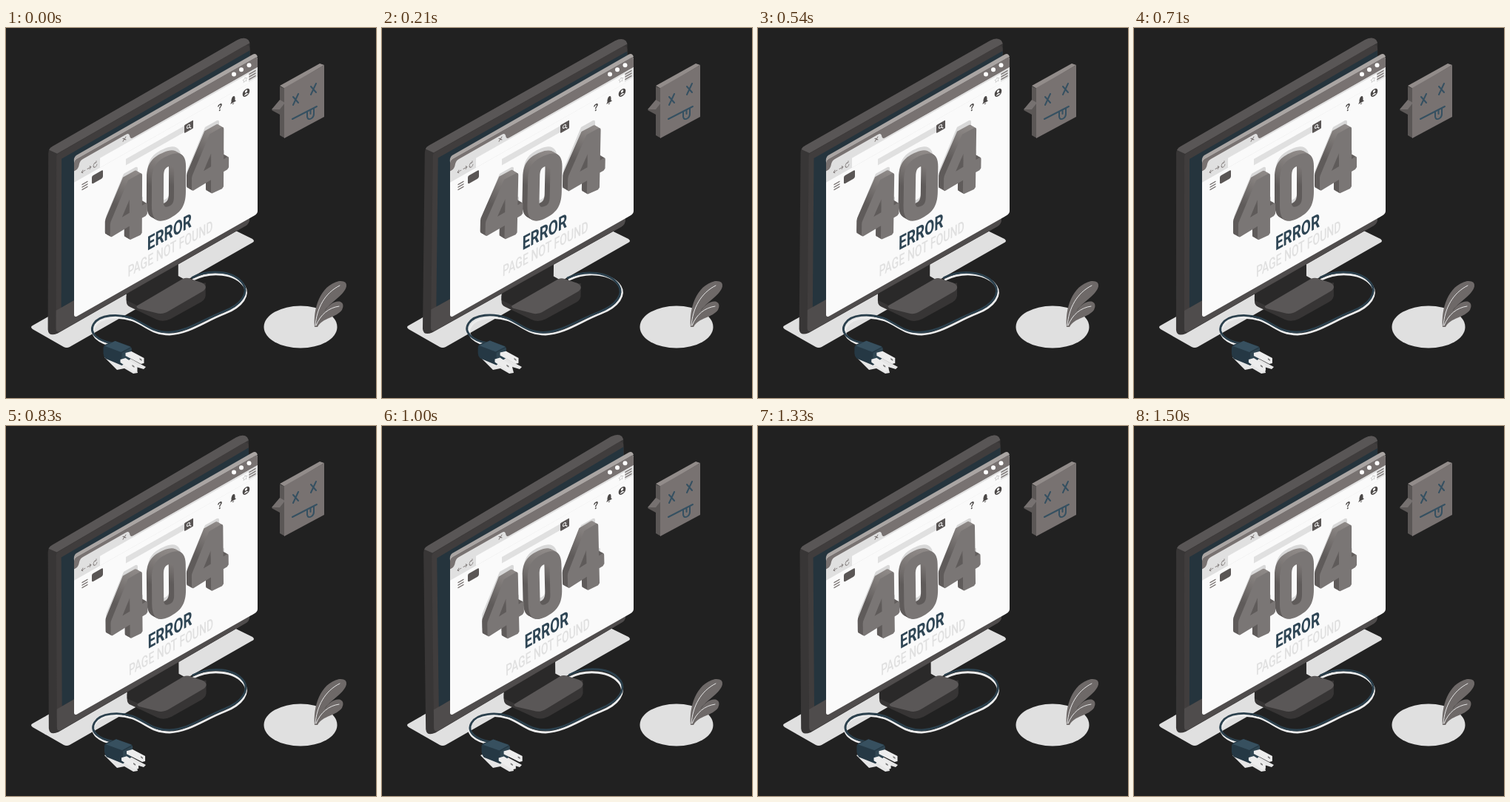
Animation of 500 by 500 pixels, one loop 1540 ms. Source, as an HTML page:

```html
<!DOCTYPE html>
<html lang="en">
<head>
<meta charset="utf-8">
<title>404</title>
<style>
html, body { margin: 0; width: 100%; height: 100%; overflow: hidden; background: #212121; }
svg { display: block; width: 100vw; height: 100vh; }
text { font-family: Roboto, sans-serif; }
.line { fill: none; stroke-linecap: round; stroke-linejoin: round; }
</style>
</head>
<body>
<svg viewBox="0 0 500 500">
  <defs>
    <path id="four" fill-rule="evenodd" d="M165 206 L181 197 Q184 196 184 199 V240 L189 237 Q191 236 191 239 V251 L189 254 L184 257 V277 L182 280 L169 286 Q167 287 167 284 V268 L144 282 Q141 284 141 280 V266 Q141 263 143 259Z M167 232 V250 L157 256Z"/>
    <path id="zero" fill-rule="evenodd" d="M197 206 C197 186 206 178 220 172 C236 165 243 172 243 187 V221 C243 241 236 250 220 258 C204 265 197 259 197 240Z M213 201 C213 192 215 189 220 187 C225 185 227 187 227 194 V228 C227 236 225 239 220 241 C215 243 213 241 213 235Z"/>
    <g id="digits">
      <use href="#four"/><use href="#zero"/><use href="#four" x="110" y="-63"/>
    </g>
    <linearGradient id="side" x2="0" y2="1">
      <stop stop-color="#8f8a88"/><stop offset=".5" stop-color="#5f5b5a"/>
    </linearGradient>
    <path id="cord" class="line" stroke-width="2.8" d="M143 426 C126 423 111 413 119 400 C127 387 152 386 170 392 C190 400 197 411 220 411 C246 410 266 394 294 383 C320 373 328 357 321 346 C309 328 276 325 252 337"/>
  </defs>

  <!-- Floor -->
  <path fill="#e0e0e0" d="M36 402 L284 261 L333 285 Q337 288 333 290 L86 431 Q82 433 78 431 L36 407 Q32 404 36 402Z"/>
  <use href="#cord" x="1" y="3" stroke="#ededed"/>
  <path fill="#e6e6e6" d="M133 445 L150 437 L189 458 L186 461 L176 458 L178 466 L172 467 L160 460 L150 462Z"/>
  <ellipse cx="398" cy="404" rx="49.5" ry="28.5" fill="#e0e0e0"/>

  <g id="monitor">
    <use href="#cord" stroke="#2b404d"/>
    <!-- Stand -->
    <path fill="#373535" d="M163 362 L270 344 V358 Q271 366 264 370 L223 393 Q213 398 204 394 L168 377 Q163 375 163 369Z"/>
    <path fill="#2a2929" d="M163 359 L233 318 V335 L242 340 L180 376 L163 368Z"/>
    <path fill="#5a5757" d="M178 375 L239 339 Q243 337 247 338 L265 344 Q274 349 267 355 L221 382 Q212 388 203 385 L179 379 Q175 377 178 375Z"/>
    <!-- Screen body -->
    <path fill="#383636" d="M57 170 Q57 163 63 160 L312 16 Q327 9 329 21 V258 Q329 264 324 267 L70 413 Q58 418 57 408Z"/>
    <path fill="#595656" d="M58 165 Q59 162 63 160 L312 16 Q322 11 327 16 L329 20 L69 170Z"/>
    <path fill="#403d3d" d="M68 175 Q68 171 72 169 L320 25 Q329 20 329 28 V258 Q329 264 324 267 L74 410 Q68 413 68 406Z"/>
    <path fill="#4f4c4c" d="M68 382 L329 233 V258 Q329 264 324 267 L74 410 Q68 413 68 406Z"/>
    <path fill="#25343d" d="M75 177 L329 30 V233 L75 378Z"/>
    <!-- Plug -->
    <path fill="#253844" d="M132 432 Q133 428 137 427 L148 423 L168 430 Q171 432 170 438 V446 L157 456 L135 447 Q132 444 132 440Z"/>
    <path fill="#37505f" d="M134 430 L148 423 L169 431 L156 438Z"/>
    <path fill="#304652" d="M157 439 L170 432 V446 L157 456Z"/>
    <path fill="#ededed" d="M162 439 L170 437 L187 446 V453 L183 454 L162 443Z M155 448 L162 446 L178 456 V463 L173 464 L155 452Z"/>
    <path fill="#777" d="M181 446 l3 2 v2 l-3 -2Z M171 455 l3 2 v2 l-3 -2Z"/>
  </g>

  <!-- Browser window: u runs along the slanted edge, v runs down -->
  <path fill="#aaa5a3" d="M92 181 Q91 175 95 172 L333 36 Q338 33 340 39 L96 183Z"/>
  <g transform="matrix(1 -.567 0 1 92 178.7)">
    <rect width="248" height="213" rx="4" fill="#fafafa"/>
    <path fill="#787271" d="M0 15 V4 Q0 0 4 0 H244 Q248 0 248 4 V15Z"/>
    <path fill="#e0e0e0" d="M0 30 V15 H2 Q6 15 7 9 Q8 5 12 5 H70 Q74 5 75 9 Q76 15 80 15 H248 V30Z"/>
    <path fill="#fafafa" d="M35 17 H236 V28 H248 V30 H35Z"/>
    <g class="line" stroke="#787271">
      <path d="M66 8 l4 4 m0 -4 l-4 4"/>
      <path stroke-width=".8" d="M10 22 h5 m-5 0 l2 -2 m-2 2 l2 2 M18 22 h5 m0 0 l-2 -2 m2 2 l-2 2 M30 20 a2.5 3 0 1 0 1 3 m-1 -5 v2 h-2"/>
      <path stroke-width="1.4" d="M237 18 h8 m-8 3.500 h8 m-8 3.500 h8 M11 39 h7 m-7 3.500 h7 m-7 3.500 h7"/>
      <path stroke="#ccc" stroke-width=".8" d="M231 19 l1 2 h2 l-1.5 2 l.5 2 l-2 -1 l-2 1 l.5 -2 l-1.5 -2 h2Z"/>
    </g>
    <rect x="24" y="35" width="15" height="11" rx="2" fill="#5a5655"/>
    <rect x="70" y="38" width="79" height="8.5" fill="#e0e0e0"/>
    <rect x="149" y="37" width="12" height="11" rx="1" fill="#5a5655"/>
    <g class="line" stroke="#fafafa"><circle cx="154.500" cy="42" r="2"/><path d="M156 44 l2 2"/></g>
    <text x="197" y="45" font-size="13" font-weight="700" text-anchor="middle" fill="#4b4847">?</text>
    <path fill="#4b4847" d="M211 44 L212.500 42 V39 Q212.500 36 215 35.500 Q217.500 36 217.500 39 V42 L219 44Z M213.500 45 h3 l-1.500 1.500Z"/>
    <circle cx="232.500" cy="40.500" r="4.800" fill="#4b4847"/>
    <circle cx="232.500" cy="38.700" r="1.700" fill="#fafafa"/>
    <path fill="#fafafa" d="M229.500 43.500 Q232.500 39.500 235.500 43.500Z"/>
  </g>
  <g fill="#fff"><circle cx="308" cy="62.500" r="3"/><circle cx="318" cy="56.300" r="3"/><circle cx="328.500" cy="50.200" r="3"/></g>
  <use href="#digits" x="-6" y="-9" fill="#d8d8d8"/>

  <g id="number">
    <g id="depth" fill="url(#side)"></g>
    <use href="#digits" fill="#7a7675"/>
  </g>
  <g id="message">
    <text transform="matrix(.73 -.4 0 1 191 301)" font-size="26" font-weight="700" fill="#2f4655">ERROR</text>
    <text transform="matrix(.67 -.368 0 1 165 337)" font-size="21" font-weight="500" fill="#e0e0e0">PAGE NOT FOUND</text>
  </g>

  <!-- Speech bubble -->
  <path fill="#5b5756" d="M370 79 L377 82 V149 L370 145 V117 L359 111 L370 98Z"/>
  <path fill="#767170" d="M359 110 L370 97 L377 101 L370 110Z"/>
  <path fill="#928c8a" d="M370 78 L424 48 L430 50 L377 82Z"/>
  <path fill="#787271" d="M376 81 L430 50 V120 L376 149Z"/>
  <path class="line" stroke="#355061" stroke-width="2" d="M388 93 l7 8 m0 -12 l-7 15 M412 79 l7 8 m0 -12 l-7 15 M387 123 L420 106 M407 113 V120 Q408 125 413 122 Q416 120 416 116 V108 M411.500 111 V116"/>

  <!-- Leaves -->
  <path fill="#6e6968" d="M417 404 C415 380 424 348 450 342 Q461 341 460 349 C457 362 438 370 430 383 C437 373 445 368 452 370 Q458 373 454 381 C446 392 428 391 421 404Z"/>
  <path class="line" stroke="#e6e6e6" d="M418 402 C420 378 431 358 451 348 M419 402 C425 387 436 378 450 376"/>
</svg>
<script>
const PERIOD = 1540, PEAK = 335;
const byId = id => document.getElementById(id);

// Thickness of the digits, stacked from back to front
for (let i = 7; i > 0; i--) {
  const layer = document.createElementNS("http://www.w3.org/2000/svg", "use");
  layer.setAttribute("href", "#digits");
  layer.setAttribute("x", -i);
  layer.setAttribute("y", -i * .57);
  byId("depth").append(layer);
}

const rotate = (id, angle, x, y) =>
  byId(id).setAttribute("transform", `rotate(${angle} ${x} ${y})`);

function draw(now) {
  const phase = ((now - PEAK) / PERIOD + 1) % 1;
  const sway = 4 * Math.abs(phase - .5) - 1;
  rotate("monitor", sway, 193, 238);
  rotate("number", 1.8 * sway, 218, 212);
  rotate("message", 1.4 * sway, 225, 205);
  requestAnimationFrame(() => draw(performance.now()));
}
draw(performance.now());
</script>
</body>
</html>
```
